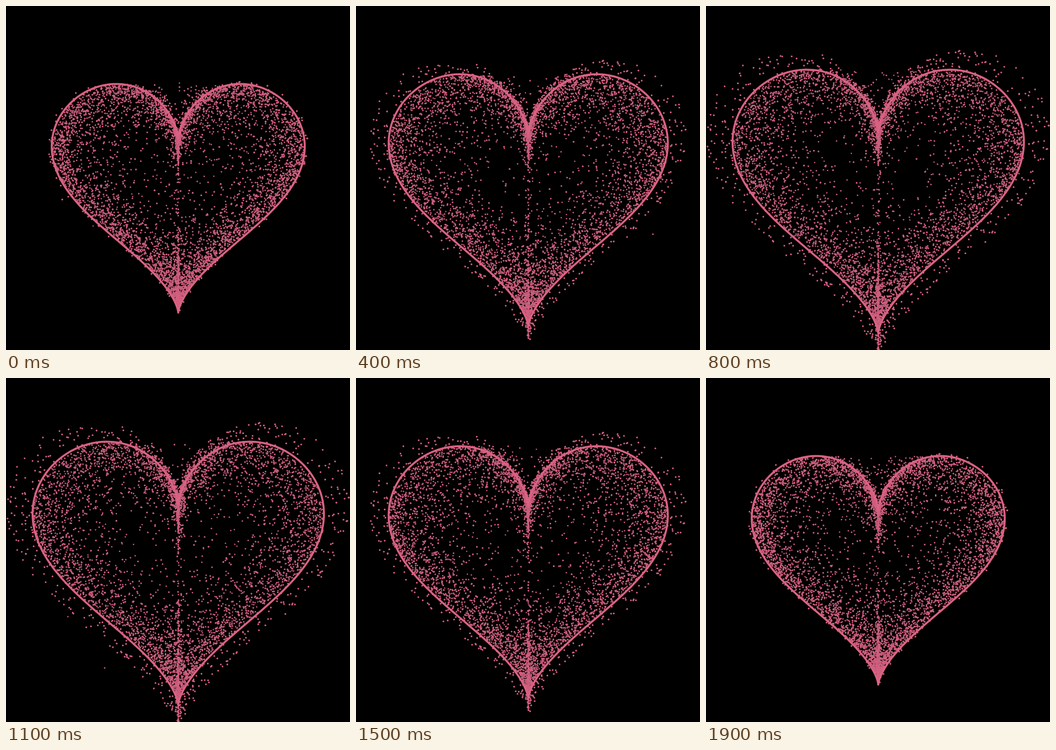
Write an HTML page with a canvas that moves like this. It is 700 px wide and 700 px high and loops after 2 s.

```html
<!DOCTYPE html>
<html>
<head>
<meta charset="utf-8">
<style>
html, body { margin: 0; height: 100%; overflow: hidden; background: #000; }
canvas { display: block; }
</style>
</head>
<body>
<canvas id="stage" width="700" height="700"></canvas>
<script>
const ctx = document.getElementById('stage').getContext('2d');
const CX = 350.5, CY = 350.5, TAU = Math.PI * 2;
const PINK = '#da6282';
const TONES = ['#d65a7e', '#cc5c7e', '#bd5876', '#c9687f'];

// Small seeded generator returning numbers in [0, 1)
function seeded(seed) {
  let s = seed * 7919 + 12345;
  return () => {
    s = (s + 0x6D2B79F5) | 0;
    let v = Math.imul(s ^ (s >>> 15), 1 | s);
    v = (v + Math.imul(v ^ (v >>> 7), 61 | v)) ^ v;
    return ((v ^ (v >>> 14)) >>> 0) / 4294967296;
  };
}

function heart(t) {
  return [
    16 * Math.sin(t) ** 3,
    5 * Math.cos(2 * t) + 2 * Math.cos(3 * t) + Math.cos(4 * t) - 13 * Math.cos(t)
  ];
}

function dot(x, y, r, color) {
  ctx.fillStyle = color;
  ctx.beginPath();
  ctx.arc(CX + x, CY + y, r, 0, TAU);
  ctx.fill();
}

// Dots pulled from the outline towards the centre, separately in x and y
function scatter(rand, count, beta, scale) {
  const pull = () => scale * (1 + beta * Math.log(1 - rand()));
  for (let i = 0; i < count; i++) {
    const [x, y] = heart(rand() * TAU);
    const px = x * pull(), py = y * pull();
    dot(px, py, 1.4 + rand() * 0.5, TONES[Math.floor(rand() * TONES.length)]);
  }
}

function ring(scale) {
  const rand = seeded(99);
  for (let i = 0; i < 640; i++) {
    const [x, y] = heart(rand() * TAU);
    const k = scale * (0.84 + 0.16 * rand());
    dot(x * k, y * k, 1.8, '#d45f7f');
  }
}

function outline(scale) {
  ctx.beginPath();
  for (let i = 0; i <= 400; i++) {
    const [x, y] = heart(i / 400 * TAU);
    ctx.lineTo(CX + x * scale, CY + y * scale);
  }
  ctx.strokeStyle = PINK;
  ctx.lineWidth = 4;
  ctx.lineJoin = 'round';
  ctx.stroke();
}

function draw(step) {
  const swell = step * (19 - step) / 90.25;
  const scale = 16.09 + 2.5 * swell;
  const rand = seeded(step === 10 ? 9 : step); // the peak holds for two steps
  ctx.fillStyle = '#000';
  ctx.fillRect(0, 0, 700, 700);
  scatter(rand, 5200, 0.2, scale);
  scatter(rand, 900, 0.06, scale);
  ring(16.65 + 5.5 * swell);
  outline(scale);
}

let shown = -1;
function tick() {
  const step = Math.floor(performance.now() / 100) % 20;
  if (step !== shown) draw(shown = step);
  requestAnimationFrame(tick);
}
tick();
</script>
</body>
</html>
```
